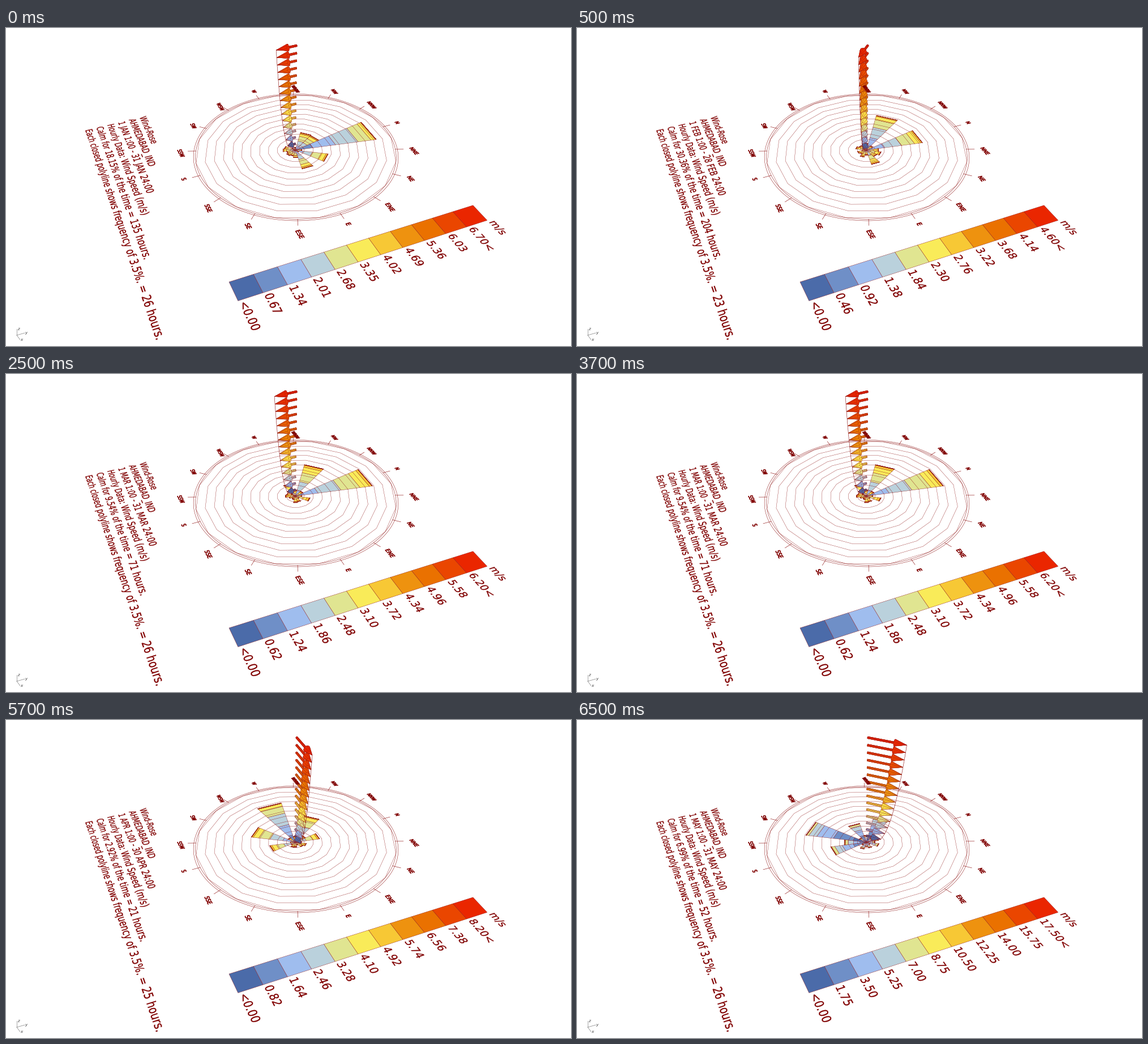
A matplotlib script for the animation above (8 s loop, 998 by 561 pixels).

```python
from itertools import pairwise

import numpy as np
import matplotlib.pyplot as plt
from matplotlib.animation import FuncAnimation
from matplotlib.colors import to_rgb
from matplotlib.patches import PathPatch, Polygon
from matplotlib.path import Path
from matplotlib.textpath import TextPath

W, H, DPI = 998, 561, 100
PX = 72 / DPI
DARK = "#800000"
LINE = "#8c1010"

# Perspective view: columns are east, north, height step, origin.
VIEW = np.array([[18.0, 182.5, -2.893, 511.0],
                 [77.5, -34.5, -12.485, 215.5],
                 [-0.104, 0.0398, -0.00596, 1.0]])

RAMP = np.array([to_rgb(c) for c in (
    "#4b6ba9", "#7393ca", "#aac8f7", "#c1d5d0", "#f5ef67",
    "#fce64a", "#ef9c15", "#ea7b00", "#ea4a00", "#ea2600")])
COMPASS = ("N NNE NE ENE E ESE SE SSE S SSW SW WSW W WNW NW NNW").split()
BINS, CELL = 11, 0.212
LEGEND_E, LEGEND_N, LABEL_E = 1.373, -1.187, 1.607
LEVELS, RINGS, ROSE = 15, 11, 0.995
RING_SHARE = 0.035
EM = 0.0976


class Month:
    """One month of wind: petals give the longest directions and their radii."""

    def __init__(self, name, days, calm, top, reach, usual_bin, **petals):
        self.name, self.days, self.calm, self.top = name, days, calm, top
        self.reach, self.usual_bin, self.petals = reach, usual_bin, petals
        self.hours = days * 24
        self.prevailing = max(petals, key=petals.get)


MONTHS = [
    Month("JAN", 31, 18.15, 6.70, .202, 2.5, N=.84, NE=.33, E=.3, NW=.3, NNW=.29),
    Month("FEB", 28, 30.36, 4.60, .225, 3.0, NW=.61, N=.58, E=.23, NE=.15),
    Month("MAR", 31, 9.54, 6.20, .219, 3.2, N=.8, NW=.55, W=.21, NE=.15),
    Month("APR", 30, 2.92, 8.20, .337, 2.7, W=.7, NW=.46, SW=.45, S=.26, N=.25),
    Month("MAY", 31, 6.99, 17.50, .374, 1.2, SW=.62, NW=.43, S=.36, W=.32, SSW=.22),
]

# The first month shows for one step, every later one for four.
STEP_MS, FRAMES, STEPS_PER_MONTH, LEAD = 500, 16, 4, 3

fig = plt.figure(figsize=(W / DPI, H / DPI), dpi=DPI, facecolor="white")
ax = fig.add_axes([0, 0, 1, 1])
ax.set_xlim(0, W)
ax.set_ylim(H, 0)
ax.axis("off")


def project(points):
    """Map (east, north[, height]) rows to stage pixels."""
    p = np.atleast_2d(np.asarray(points, float))
    if p.shape[1] == 2:
        p = np.column_stack([p, np.zeros(len(p))])
    q = np.column_stack([p, np.ones(len(p))]) @ VIEW.T
    return q[:, :2] / q[:, 2:]


def ramp(t):
    x = np.clip(t, 0, 1) * (len(RAMP) - 1)
    return tuple(np.interp(x, range(len(RAMP)), RAMP[:, c]) for c in range(3))


def azimuth(name):
    return COMPASS.index(name) * np.pi / 8


def polar(r, angle):
    return np.column_stack([r * np.sin(angle), r * np.cos(angle)])


def face(points, color, z, width=0.4):
    patch = Polygon(project(points), closed=True, fc=color, ec=LINE,
                    lw=width * PX, joinstyle="round", zorder=z)
    return ax.add_patch(patch)


def stroke(points, z, width=0.4):
    xy = project(points)
    return ax.plot(xy[:, 0], xy[:, 1], color=LINE, lw=width * PX, zorder=z)[0]


def ground_text(east, north, text, em=EM, edge=0.3):
    """Lay text flat on the ground, reading towards the east."""
    glyphs = TextPath((0, 0), text, size=100, prop="DejaVu Sans")
    flat = glyphs.vertices * em / 100 + (east, north)
    patch = PathPatch(Path(project(flat), glyphs.codes), fc=DARK, ec=DARK,
                      lw=edge * PX, zorder=6)
    return ax.add_patch(patch)


def draw_rose():
    circle = np.linspace(0, 2 * np.pi, 181)
    corners = (np.arange(17) + 0.5) * np.pi / 8
    for scale in (1, 1.02):
        stroke(polar(ROSE * scale, circle), 3, 0.5)
    for k in range(1, RINGS + 1):
        stroke(polar(ROSE * k / RINGS, corners), 3, 0.38)
    for name in COMPASS:
        a = azimuth(name)
        stroke(polar(ROSE * np.array([1, 1.08]), a), 3, 0.6)
        east, north = polar(1.16, np.array([a]))[0]
        ground_text(east - 0.028, north - 0.016, name, 0.058, 0.8)


def draw_legend_cells():
    e = LEGEND_E
    for i in range(BINS):
        n = LEGEND_N + i * CELL
        face([(e, n), (e, n + CELL), (e + CELL, n + CELL), (e + CELL, n)],
             ramp(i / (BINS - 1)), 3)
    ground_text(LABEL_E, LEGEND_N + BINS * CELL, "m/s")


def draw_gizmo():
    origin = np.array([19, 542])
    for name, step in (("z", (0, -11)), ("y", (14, -4)), ("x", (6, 8))):
        x, y = origin + step
        ax.plot([origin[0], x], [origin[1], y], color="#909090", lw=0.8 * PX)
        ax.text(x + 2.5, y, name, fontsize=7 * PX, family="DejaVu Sans",
                style="italic", color="#404040", ha="center", va="center")


def draw_petals(month, rng):
    """Stack speed bins outwards; shorter petals lean to faster winds."""
    parts = []
    bins = np.arange(BINS)
    longest = month.petals[month.prevailing]
    for name in COMPASS:
        radius = month.petals.get(name, rng.uniform(0.04, 0.13))
        center = month.usual_bin + 1.5 * (1 - radius / longest)
        shares = np.exp(-((bins - center) / 1.9) ** 2)
        ends = radius * np.append(0, np.cumsum(shares)) / shares.sum()
        sides = azimuth(name) + np.array([-1, 1]) * np.pi / 16
        for i, (r0, r1) in enumerate(pairwise(ends)):
            sector = np.vstack([polar(r0, sides), polar(r1, sides[::-1])])
            parts.append(face(sector, ramp(i / (BINS - 1)), 2))
    return parts


def draw_arrow(level, direction, length, color):
    along = np.array([*direction, 0])
    side = np.array([-direction[1], direction[0], 0])
    up = np.array([0, 0, 13.0])
    start = np.array([0, 0, level])
    turn = np.arange(8) * np.pi / 4
    z = 4 + level / 100

    def loop(distance, radius):
        circle = np.outer(np.cos(turn), side) + np.outer(np.sin(turn), up)
        return start + along * distance + radius * circle

    def skin(near, far):
        return [face([near[i - 1], near[i], far[i], far[i - 1]], color, z, 0.25)
                for i in range(len(turn))]

    neck = length - min(0.115, 0.6 * length)
    tail, collar, rim = loop(0, 0.010), loop(neck, 0.010), loop(neck, 0.033)
    point = loop(length, 0)
    parts = [face(tail, color, z)] + skin(tail, collar)
    parts += [face(rim, color, z)] + skin(rim, point)
    return parts, point[0]


def draw_profile(month):
    """Arrows that lengthen with height by a power law."""
    direction = polar(1, np.array([azimuth(month.prevailing) + np.pi]))[0]
    speed = (np.arange(LEVELS + 1) / LEVELS) ** 0.33
    parts, tips = [], [np.zeros(3)]
    for level in range(1, LEVELS + 1):
        t = (speed[level] - speed[1]) / (1 - speed[1])
        arrow, tip = draw_arrow(level, direction, month.reach * speed[level],
                                ramp(t))
        parts += arrow
        tips.append(tip)
    return parts + [stroke(tips, 5, 0.6)]


def draw_texts(m):
    calm_hours = round(m.hours * m.calm / 100)
    lines = ["Wind-Rose", "AHMEDABAD_IND",
             f"1 {m.name} 1:00 - {m.days} {m.name} 24:00",
             "Hourly Data: Wind Speed (m/s)",
             f"Calm for {m.calm:.2f}% of the time = {calm_hours} hours.",
             f"Each closed polyline shows frequency of {RING_SHARE:.1%}. = "
             f"{int(m.hours * RING_SHARE)} hours."]
    parts = [ground_text(-1.182, -1.30 - 0.116 * i, line)
             for i, line in enumerate(lines)]
    labels = [f"{m.top * i / (BINS - 1):.2f}" for i in range(BINS)]
    labels[0] = "<" + labels[0]
    labels[-1] += "<"
    return parts + [ground_text(LABEL_E, LEGEND_N + i * CELL, label)
                    for i, label in enumerate(labels)]


draw_rose()
draw_legend_cells()
draw_gizmo()
layers = [draw_petals(m, np.random.default_rng(i)) + draw_profile(m)
          + draw_texts(m) for i, m in enumerate(MONTHS)]


def update(frame):
    current = (frame + LEAD) // STEPS_PER_MONTH
    for i, layer in enumerate(layers):
        for part in layer:
            part.set_visible(i == current)
    return []


update(0)
anim = FuncAnimation(fig, update, frames=FRAMES, interval=STEP_MS,
                     repeat=True, repeat_delay=0, blit=False)
plt.show()
```
